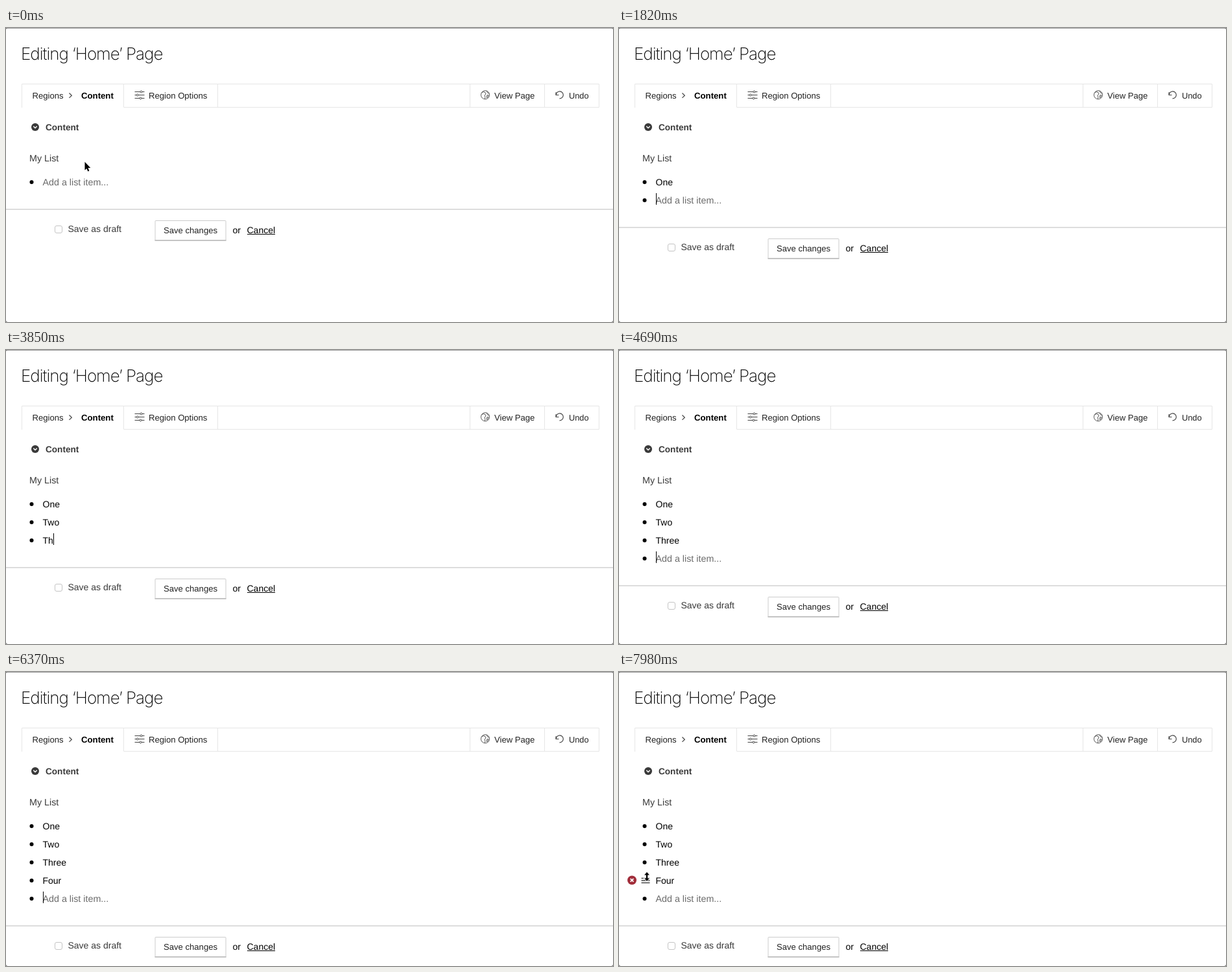
Recreate the animation shown at these times as an HTML page. Size 936 by 454 pixels, loop 8000 ms.

```html
<!DOCTYPE html>
<html lang="en">
<head>
<meta charset="utf-8">
<title>List editor</title>
<style>
html, body { margin: 0; width: 100%; height: 100%; overflow: hidden; background: #fff; }
svg { display: block; }
text { font: 14.3px "Liberation Sans", Arial, sans-serif; fill: #000; white-space: pre; text-rendering: geometricPrecision; }
.title { font: 200 26px Inter, Roboto, sans-serif; letter-spacing: -.04em; }
.nav { font-size: 13.1px; fill: #222; }
.bold { font-weight: 700; font-size: 13.2px; fill: #000; }
.gray { fill: #3a3a3a; }
.action { font-size: 14px; }
.hint { fill: #6b6b6b; }
.line { fill: none; stroke: #e6e6e6; }
.icon { fill: none; stroke: #444; }
</style>
</head>
<body>
<svg width="936" height="454" viewBox="0 0 936 454">
  <path d="M0 .5H936" stroke="#a0a0a0"/>
  <path d="M0 0H3Q0 0 0 3ZM936 0V3Q936 0 933 0ZM0 454V451Q0 454 3 454ZM936 454H933Q936 454 936 451Z" fill="#666"/>
  <text class="title" x="23" y="49">Editing ‘Home’ Page</text>

  <path class="line" d="M24.5 123V86.5H914.5V122.5H181.5V86.5M326.5 86V122M715.5 86V122M830.5 86V122"/>
  <text class="nav" x="40.5" y="108.5">Regions</text>
  <path class="icon" d="M97.5 100.500L101.300 104.200L97.5 107.900" stroke-width="1.2"/>
  <text class="bold" x="116" y="108.5">Content</text>
  <g class="icon">
    <path d="M198.500 98.500H213.500M198.500 103.500H213.500M198.500 108.500H213.500"/>
    <g fill="#fff"><circle cx="208.500" cy="98.500" r="1.500"/><circle cx="202.500" cy="103.500" r="1.500"/><circle cx="207.500" cy="108.500" r="1.500"/></g>
  </g>
  <text class="nav" x="220" y="108.5">Region Options</text>
  <g class="icon" stroke-width=".9">
    <circle cx="739" cy="103.300" r="6.600"/>
    <path d="M733.500 100L736 98.500L739 99.500L740 102L738 104L739 107L738 109.500M741 97L742.500 100L745 101M741.500 104L744 103.500L743.500 106L741.500 108Z"/>
  </g>
  <text class="nav" x="753" y="108.5">View Page</text>
  <path class="icon" stroke-width="1.2" d="M848 99.200V103.500H852.500M848.300 103.200A5.500 5.500 0 1 1 853.500 108.800"/>
  <text class="nav" x="868" y="108.5" style="font-size:12.8px">Undo</text>

  <circle cx="45" cy="153" r="6" fill="#3a3a3a"/>
  <path d="M42.300 151.800L45 154.500L47.700 151.800" fill="none" stroke="#fff" stroke-width="1.5"/>
  <text class="gray" x="61" y="158" style="font-weight:700;font-size:13.6px">Content</text>
  <text class="gray" x="36" y="205.5">My List</text>

  <g id="list"></g>
  <path id="caret" d="M57.500 227V245" stroke="#000"/>

  <g id="footer">
    <path d="M0 280H936" stroke="#d2d2d2" stroke-width="1.5"/>
    <rect x="75.5" y="305.500" width="11" height="11" rx="2.500" fill="#fff" stroke="#c4c4c4"/>
    <text class="gray action" x="95.5" y="315">Save as draft</text>
    <rect x="230" y="297.500" width="109" height="31" rx="1" fill="#fff" stroke="#ccc"/>
    <path d="M229.500 328H339.500" stroke="#c4c4c4" stroke-width="2"/>
    <text class="nav" x="243" y="317">Save changes</text>
    <text class="action" x="349.500" y="317">or</text>
    <text class="action" x="371.500" y="317">Cancel</text>
    <path d="M372 318.500H415" stroke="#000"/>
  </g>

  <g id="tools">
    <circle cx="20" cy="237.500" r="7" fill="#a12d3a"/>
    <path d="M17.600 235.100L22.400 239.900M22.400 235.100L17.600 239.900" stroke="#fff" stroke-width="1.800"/>
    <path d="M34.500 234.500H47.500M34.500 238H47.500M34.500 241.500H47.500" stroke="#444" stroke-width="1.500"/>
  </g>
  <path id="arrow" d="M.5 .8V13.500L3.400 10.900L5.300 15.400L7.400 14.500L5.500 10.100H9.300Z" stroke="#fff" stroke-width="1.200" paint-order="stroke"/>
  <path id="resize" d="M0 -7L4 -2.500H1.200V2.500H4L0 7L-4 2.500H-1.200V-2.500H-4Z" stroke="#fff" stroke-width="1.500" paint-order="stroke"/>
</svg>
<script>
const LOOP = 8000, ROW = 28, TOP = 224, BLINK = 490, FOCUS = 490;
const HINT = 'Add a list item...';
const MOVE = { start: 7280, end: 7910, from: [121, 206], to: [43, 316] };
const keys = [
  [770, 'O'], [1050, 'n'], [1190, 'e'], [1820, '\n'],
  [2100, 'T'], [2590, 'w'], [2730, 'o'], [3080, '\n'],
  [3570, 'T'], [3850, 'h'], [4130, 'r'], [4410, 'e'], [4480, 'e'], [4690, '\n'],
  [5320, 'F'], [5670, 'o'], [5740, 'u'], [5810, 'r'], [6370, '\n']
];

const byId = id => document.getElementById(id);
const show = (el, on) => el.setAttribute('visibility', on ? 'visible' : 'hidden');
const place = (el, x, y) => el.setAttribute('transform', `translate(${x} ${y})`);
const [list, caret, footer, tools, arrow, resize] =
  ['list', 'caret', 'footer', 'tools', 'arrow', 'resize'].map(byId);

list.innerHTML = Array.from({ length: 5 }, (_, i) =>
  `<g transform="translate(0 ${i * ROW})"><circle cx="39.500" cy="238" r="3"/><text x="56.500" y="242.500"></text></g>`).join('');
const rows = [...list.children].map(group => ({
  group, bullet: group.firstChild, label: group.lastChild
}));

function pointerAt(t) {
  const p = Math.min(1, Math.max(0, (t - MOVE.start) / (MOVE.end - MOVE.start)));
  const eased = p * p * (3 - 2 * p);
  return MOVE.from.map((a, i) => a + (MOVE.to[i] - a) * eased);
}

function draw(t) {
  const typed = keys.filter(([time]) => time <= t);
  const items = typed.map(([, key]) => key).join('').split('\n');
  const last = items.length - 1;
  const moving = t >= MOVE.start;
  const [x, y] = pointerAt(t);
  const hovered = moving && y >= TOP ? Math.floor((y - TOP) / ROW) : -1;

  rows.forEach(({ group, bullet, label }, i) => {
    group.style.display = i <= last ? '' : 'none';
    show(bullet, i !== hovered);
    label.textContent = items[i] || HINT;
    label.setAttribute('class', items[i] ? 'action' : 'hint');
  });

  const lastKey = typed.length ? typed[typed.length - 1][0] : FOCUS;
  const width = items[last] ? rows[last].label.getComputedTextLength() : 0;
  show(caret, t >= FOCUS && Math.floor((t - lastKey) / BLINK) % 2 === 0);
  place(caret, Math.round(width), last * ROW);
  place(footer, 0, last * ROW);

  const onHandle = hovered >= 0 && x < 50;
  show(tools, hovered >= 0);
  place(tools, 0, hovered * ROW);
  show(arrow, !onHandle && (moving || !typed.length));
  show(resize, onHandle);
  place(arrow, x, y);
  place(resize, x, y);
}

function frame() {
  draw(performance.now() % LOOP);
  requestAnimationFrame(frame);
}
frame();
</script>
</body>
</html>
```
